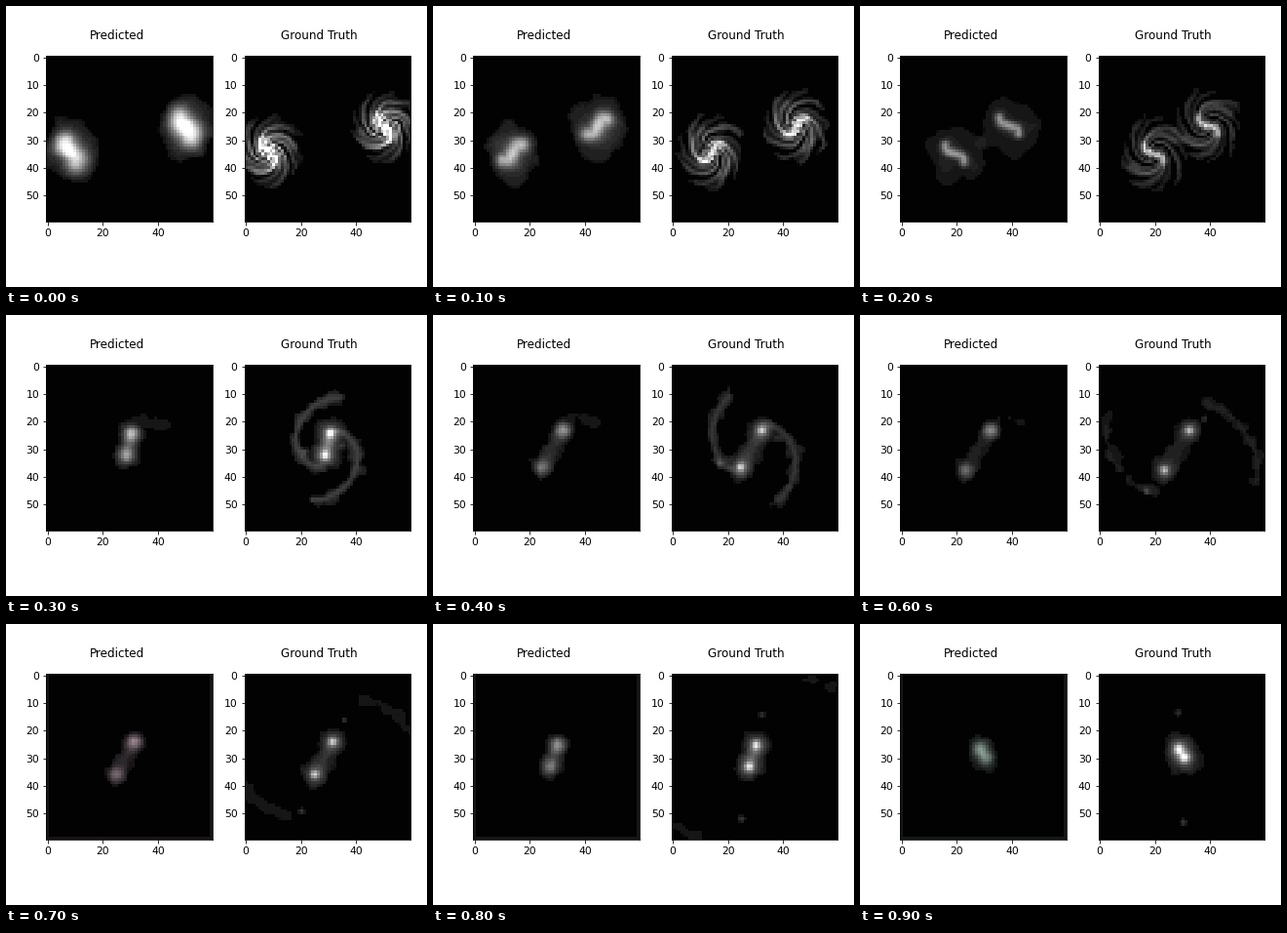
A matplotlib script that plays this animation: 432 px wide and 288 px high, repeating every 1000 ms.

```python
import numpy as np
import matplotlib.pyplot as plt
from matplotlib.animation import FuncAnimation

W, H, DPI = 432, 288, 72
N = 60
FRAMES = 10
CONTACT = 3  # frame at which the two discs have merged into one body
SIDE, TOP = 170.3, 51.1
MIDDLE = np.array([29, 30])

plt.rcParams["font.family"] = "DejaVu Sans"

Y, X = np.mgrid[0:N, 0:N].astype(float)


def blur(img, sigma):
    i = np.arange(N)
    k = np.exp(-((i[:, None] - i) ** 2) / (2 * sigma**2))
    k /= k.sum(axis=1, keepdims=True)
    return k @ img @ k.T


def grain(seed, sigma):
    noise = blur(np.random.default_rng(seed).normal(size=(N, N)), sigma)
    return noise / noise.std()


FINE, COARSE = grain(4, 1.1), grain(9, 1.8)


def distance(points):
    """Distance of every cell to a polyline (or to a single point)."""
    pts = np.atleast_2d(points)
    best = np.hypot(X - pts[0, 0], Y - pts[0, 1])
    for (ax, ay), (bx, by) in zip(pts[:-1], pts[1:]):
        dx, dy = bx - ax, by - ay
        u = ((X - ax) * dx + (Y - ay) * dy) / (dx * dx + dy * dy + 1e-9)
        u = np.clip(u, 0, 1)
        best = np.minimum(best, np.hypot(X - ax - u * dx, Y - ay - u * dy))
    return best


def glow(points, width, level):
    return level * np.exp(-((distance(points) / width) ** 2) / 2)


def patch(points, width, level):
    """Nearly flat haze with a ragged rim."""
    d = np.maximum(distance(points) + 0.8 * FINE, 0)
    return level * np.exp(-((d / width) ** 4))


def polar(radius, angle):
    return np.stack([radius * np.cos(angle), radius * np.sin(angle)], axis=-1)


def bar(centre, t, reach):
    """S-shaped bar that turns with the disc; its ends trail clockwise."""
    s = np.linspace(-reach, reach, 25)
    bend = 0.22 * np.maximum(np.abs(s) - 3, 0) ** 1.3
    return centre + polar(s, np.radians(80 * t - 140) + bend)


def disc(centre, t, arms):
    dx, dy = X - centre[0], Y - centre[1]
    r = np.hypot(dx / 0.88, dy)
    body = 280 * 0.45**t * np.exp(-r / (6 * 1.8**t))
    if arms:
        turn = np.arctan2(dy, dx) - 2.1 * np.log(r + 1.5) - 1.4 * t + 0.05 * FINE
        wave = 0.5 + 0.34 * np.cos(9 * turn) + 0.24 * np.cos(5 * turn + 1)
        body *= 0.15 + 1.3 * np.clip(wave, 0, 1) ** 1.5
        rim = 13.5 + 0.8 * FINE
    else:
        body *= 0.55 + 0.1 * COARSE
        rim = 11.5 + COARSE
    return body * np.clip((rim - r) / 2 + 0.5, 0, 1)


def approach(t):
    """Two spiral discs drift toward each other and fade."""
    truth, guess = np.zeros((2, N, N))
    offset = np.array([5.5 * t - 20.8, 4.4 + 0.3 * t])
    for centre in (MIDDLE + offset, MIDDLE - offset):
        truth += disc(centre, t, True)
        truth += glow(bar(centre, t, 4.5), 1.3 - 0.2 * t, 115)
        truth += glow(bar(centre, t, 9), 0.9, 45)
        guess += blur(disc(centre, t, False), 0.8)
        guess += glow(bar(centre, t, 4.5), 2.5 - 0.65 * t, 150 - 15 * t)
    return truth, guess


def tidal_arm(t):
    """Spiral tail, relative to the middle, flung outward at a growing rate."""
    age = t - CONTACT
    start = 110 + 3 * age
    angle = np.radians(np.linspace(start, max(285 - 40 * age, 202), 16))
    return polar(7 * 1.9 ** (age / 2) * np.exp(0.33 * (angle - angle[0])), angle)


def merger(t):
    """The cores swing apart once and fall back while the tails fly off."""
    age = t - CONTACT
    p = age / (FRAMES - 1 - CONTACT)
    swing = np.sin(np.pi * p**0.8)
    close = 1 - swing
    middle = np.array([29.4 - 1.8 * swing, 28.5 + 2.2 * swing])
    offset = np.array([1.9 * p - 0.9 - 4.7 * swing, 3.9 - 2.4 * p + 4.6 * swing])
    low, high = middle + offset, middle - offset
    cores = np.array([low, high])
    body_width = 4.2 + 1.8 * close

    truth = patch(cores, body_width, 26 + 10 * close)
    arm = tidal_arm(t)
    for tail in (MIDDLE + arm, MIDDLE - arm):
        truth = np.maximum(truth, patch(tail, 2, 34 * 0.9**age))
        truth += glow(tail, 0.8, max(28 - 9 * age, 0))
    truth += glow(cores, 1.6, 70 * close)
    knot = polar(25 * (1 - np.exp(-(age + 1) / 2.6)), np.radians(171 - 14 * age))
    truth += glow(MIDDLE + knot, 0.9, 50) + glow(MIDDLE - 0.7 * knot, 0.9, 45)

    guess = patch(cores, 0.8 * body_width, 25 + 5 * close)
    guess += glow(cores, 1.8, 55 * close)
    for core, level in ((low, 80), (high, 110)):
        truth += glow(core, 1, 120) + glow(core, 2.4, 50)
        guess += glow(core, 1.8, level * (1 - 0.5 * close * p))
    plume = high + np.array([[0, -3], [5, -5], [11, -3]])
    guess = np.maximum(guess, patch(plume, 3.2 - 0.7 * age, 24)) if age < 4 else guess
    return truth, guess


def to_rgb(img, green=1.0):
    level = np.where(img < 14, 0, np.round(img / 10) * 10)
    rgb = level[..., None] * np.array([2 - green, green, 1]) + 2
    return np.clip(rgb, 0, 255).astype(np.uint8)


def panels(t):
    truth, guess = approach(t) if t < CONTACT else merger(t)
    green = 1.0
    if t >= 7:
        # the prediction ends with a faint border and a drifting tint
        guess[-1] = guess[:, 0] = guess[:, -1] = 18
        green -= 0.07 * np.cos(np.pi * (t - 7) / 2)
    return to_rgb(guess, green), to_rgb(truth)


def add_panel(left, title, title_x):
    ax = fig.add_axes([left / W, 1 - (TOP + SIDE) / H, SIDE / W, SIDE / H])
    image = ax.imshow(np.zeros((N, N, 3), np.uint8), interpolation="nearest", aspect="auto")
    ax.set_xticks(range(0, N, 20))
    ax.set_yticks(range(0, N, 10))
    ax.tick_params(labelsize=10.8)
    fig.text(title_x / W, 1 - 34 / H, title, fontsize=12, ha="left", va="baseline")
    return image


fig = plt.figure(figsize=(W / DPI, H / DPI), dpi=DPI, facecolor="white")
images = (add_panel(41.2, "Predicted", 86), add_panel(244.5, "Ground Truth", 281.5))


def update(frame):
    for image, rgb in zip(images, panels(frame)):
        image.set_data(rgb)
    return images


anim = FuncAnimation(fig, update, frames=FRAMES, interval=100, repeat=True, repeat_delay=0)
plt.show()
```
